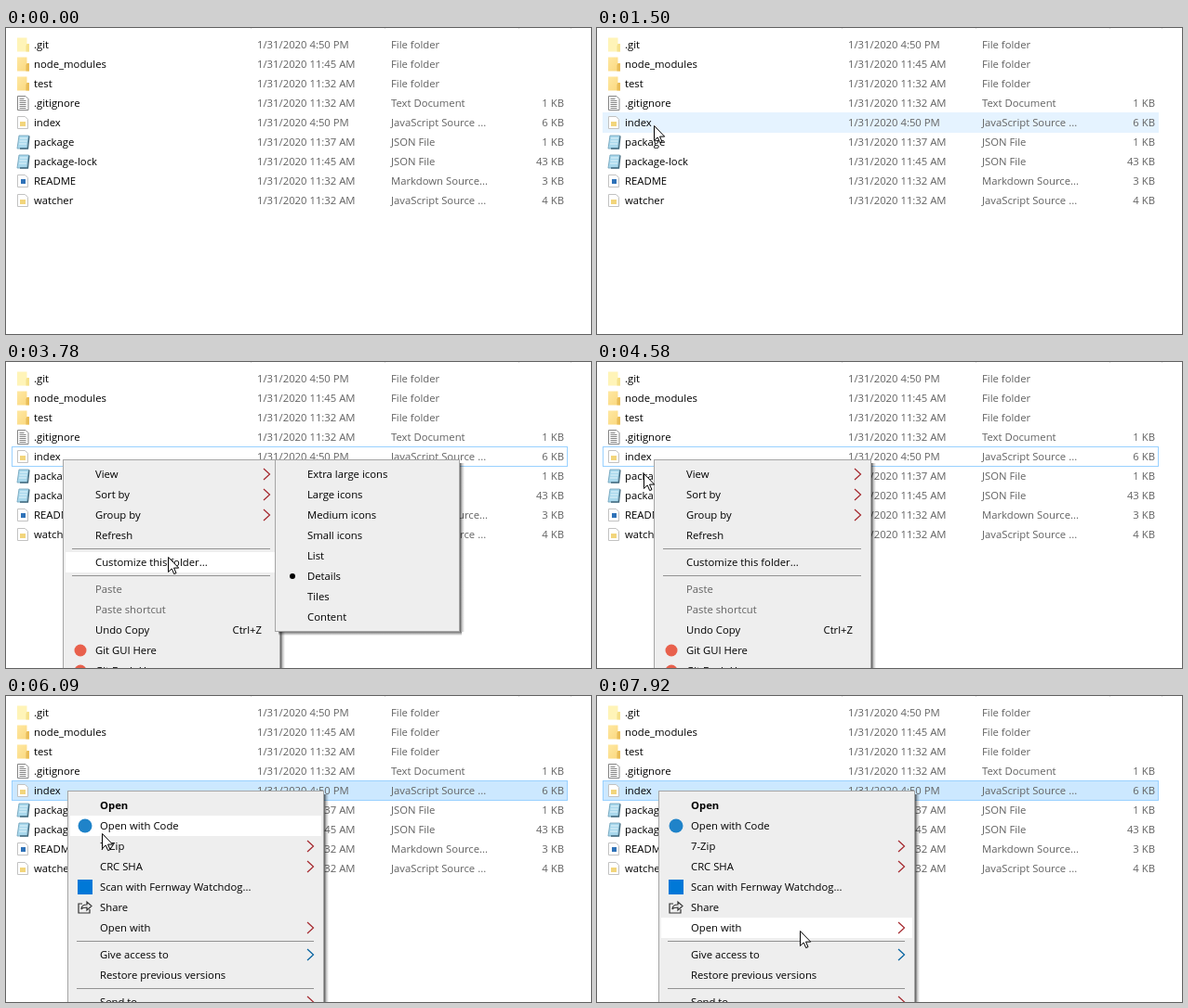
An HTML page for the animation above (8000 ms loop, 629 by 330 pixels).

```html
<!DOCTYPE html>
<html lang="en">
<head>
<meta charset="utf-8">
<title>File list with context menus</title>
<style>
  html, body { margin: 0; width: 100%; height: 100%; overflow: hidden; background: #fff; }
  svg { display: block; width: 629px; height: 330px; }
  text { font: 11.3px "Open Sans", "Noto Sans", sans-serif; fill: #000; white-space: pre; }
  .dim { fill: #626262; }
  .bold { font-weight: 700; }
  .end { text-anchor: end; }
  rect { shape-rendering: crispEdges; }
  .line { fill: none; stroke-width: 1.2; }
</style>
</head>
<body>
<svg viewBox="0 0 629 330">
  <defs>
    <linearGradient id="right"><stop stop-color="#000" stop-opacity=".65"/><stop offset=".5" stop-color="#000" stop-opacity=".22"/><stop offset="1" stop-color="#000" stop-opacity="0"/></linearGradient>
    <linearGradient id="down" x2="0" y2="1"><stop stop-color="#000" stop-opacity=".55"/><stop offset="1" stop-color="#000" stop-opacity="0"/></linearGradient>
    <linearGradient id="gold" x2="1" y2="1"><stop stop-color="#ffe8a2"/><stop offset="1" stop-color="#fad77c"/></linearGradient>
    <g id="folder">
      <path d="M0-7.500h10.500V-1H13V7.500H0z" fill="url(#gold)"/>
      <path d="M10.500-1H13V7.500H9.500V1z" fill="#e9bd58"/>
    </g>
    <g id="paleFolder">
      <path d="M0-7.500h10.500V-1H13V7.500H0z" fill="#fff4b8"/>
      <path d="M10.500-1H13V7.500H9.500V1z" fill="#f6e28e"/>
    </g>
    <path id="page" d="M.5-6.5h8l3 3v10H.5z" fill="#fff" stroke="#c2c2c2"/>
    <g id="doc">
      <path d="M.5-7.5h8.500l3 3v12H.5z" fill="#fff" stroke="#858585"/>
      <path d="M2.500-4.500h5m-5 2h7m-7 2h7m-7 2h7m-7 2h7m-7 2h7" stroke="#777" stroke-width=".9"/>
    </g>
    <g id="script"><use href="#page"/><rect x="3" y="-1" width="6" height="5" fill="#f2d57c"/></g>
    <g id="mark"><use href="#page"/><rect x="4" y="-2" width="5" height="5" fill="#2f72b8"/></g>
    <g id="pad">
      <path d="M2-7h10.500L10.500 7H0z" fill="#a9d8ec" stroke="#6d9fb8" stroke-width=".8"/>
      <path d="M3-4h8m-8.500 3h8m-8.500 3h8" stroke="#e4f5fb"/>
      <path d="M13-6.500 11.500 7H3" fill="none" stroke="#41697d" stroke-width="1.300"/>
    </g>
    <g id="share" class="line" stroke="#333">
      <path d="M-3-4h-4V6H5V2"/>
      <path d="M-4 2c0-4 3-5 6-5v-3l5 4.500L2 3V0c-3 0-5 0-6 2z"/>
    </g>
  </defs>
  <path d="M263.500 0v1M407.500 0v1M551.500 0v1M607.500 0v1" stroke="#ddd"/>
  <rect id="hover" x="6" width="598" height="22" fill="#e5f3ff"/>
  <rect id="focus" x="6.5" y="91.5" width="597" height="21" stroke="#99d1ff"/>
  <g id="files"></g>
  <g id="menus"></g>
  <path id="cursor" d="M.5.5v16l3.700-3.600 2.500 5.700 2.300-1-2.500-5.500h5.200z" fill="#fff" stroke="#000"/>
</svg>
<script>
const $ = id => document.getElementById(id);
const show = (node, on) => node.setAttribute('visibility', on ? 'visible' : 'hidden');
const label = (x, y, s, cls = '') => `<text x="${x}" y="${y + 4}" class="${cls}">${s}</text>`;
const use = (id, x, y) => `<use href="#${id}" x="${x}" y="${y}"/>`;

// name, icon, time, type, size
const files = [
  ['.git', 'paleFolder', '4:50 PM', 'File folder', ''],
  ['node_modules', 'folder', '11:45 AM', 'File folder', ''],
  ['test', 'folder', '11:32 AM', 'File folder', ''],
  ['.gitignore', 'doc', '11:32 AM', 'Text Document', '1 KB'],
  ['index', 'script', '4:50 PM', 'JavaScript Source ...', '6 KB'],
  ['package', 'pad', '11:37 AM', 'JSON File', '1 KB'],
  ['package-lock', 'pad', '11:45 AM', 'JSON File', '43 KB'],
  ['README', 'mark', '11:32 AM', 'Markdown Source...', '3 KB'],
  ['watcher', 'script', '11:32 AM', 'JavaScript Source ...', '4 KB']
];
$('files').innerHTML = files.map(([name, icon, time, type, size], i) => {
  const y = 18 + 21 * i;
  return use(icon, 12, y) + label(30, y, name) +
    label(270, y, '1/31/2020 ' + time, 'dim') + label(414, y, type, 'dim') + label(600, y, size, 'dim end');
}).join('');

const red = '#a4262c', blue = '#00609f';
const dot = (fill, r) => (x, y) => `<circle cx="${x}" cy="${y}" r="${r}" fill="${fill}"/>`;
const box = fill => (x, y) => `<rect x="${x - 8}" y="${y - 8}" width="16" height="16" fill="${fill}"/>`;
const git = dot('#e8604c', 6.5);

// An item is a label or [label, options]; '-' is a separator.
function menu(x, y, w, h, items) {
  const r = x + w, rows = [];
  let top = y + 5, body = '';
  for (const item of items) {
    if (item === '-') {
      body += `<rect x="${x + 10}" y="${top + 3}" width="${w - 21}" height="1" fill="#929292"/>`;
      top += 7;
      continue;
    }
    const [text, { arrow, icon, cls, key } = {}] = [].concat(item);
    const mid = top + 11;
    body += label(x + 35, mid, text, cls);
    if (icon) body += icon(x + 19, mid);
    if (key) body += label(r - 20, mid, key, 'end');
    if (arrow) body += `<path class="line" d="M${r - 18} ${mid - 6}l6.500 6-6.500 6" stroke="${arrow}"/>`;
    rows.push(top);
    top += 22;
  }
  const node = document.createElementNS('http://www.w3.org/2000/svg', 'g');
  node.innerHTML = `<rect x="${r}" y="${y + 4}" width="5" height="${h - 4}" fill="url(#right)"/>
    <rect x="${x + 4}" y="${y + h}" width="${w - 2}" height="4" fill="url(#down)"/>
    <g><rect x="${x + .5}" y="${y + .5}" width="${w - 1}" height="${h - 1}" fill="#eee" stroke="#a5a5a5"/>
    <rect x="${x + 3}" width="${w - 6}" height="22" fill="#fff"/>${body}</g>`;
  $('menus').append(node);
  const inner = node.querySelector('g'), bar = inner.querySelectorAll('rect')[1];
  return (t, from, to, cx, cy) => {
    const open = t > from && t < to;
    node.style.display = open ? '' : 'none';
    inner.setAttribute('opacity', Math.min(1, Math.max(0, (t - from) / 240)));
    const row = rows.find(v => cy >= v && cy < v + 22);
    const on = open && row !== undefined && cx > x + 2 && cx < r - 2;
    bar.style.display = on ? '' : 'none';
    if (on) bar.setAttribute('y', row);
  };
}

const folderMenu = menu(61, 105, 234, 260, [
  ['View', { arrow: red }], ['Sort by', { arrow: red }], ['Group by', { arrow: red }], 'Refresh', '-',
  'Customize this folder...', '-',
  ['Paste', { cls: 'dim' }], ['Paste shortcut', { cls: 'dim' }], ['Undo Copy', { key: 'Ctrl+Z' }],
  ['Git GUI Here', { icon: git }], ['Git Bash Here', { icon: git }]
]);
const viewMenu = menu(289, 105, 199, 186, [
  'Extra large icons', 'Large icons', 'Medium icons', 'Small icons', 'List',
  ['Details', { icon: dot('#000', 3) }], 'Tiles', 'Content'
]);
const fileMenu = menu(66, 102, 276, 260, [
  ['Open', { cls: 'bold' }], ['Open with Code', { icon: dot('#1f83c9', 7.5) }],
  ['7-Zip', { arrow: red }], ['CRC SHA', { arrow: red }],
  ['Scan with Fernway Watchdog...', { icon: box('#0078d7') }],
  ['Share', { icon: (x, y) => use('share', x, y) }], ['Open with', { arrow: red }], '-',
  ['Give access to', { arrow: blue }], 'Restore previous versions', '-', ['Send to', { arrow: red }]
]);

// Pointer path: time, x, y
const path = [
  [140, 122, 322], [540, 92, 222], [780, 74, 164], [940, 69, 148], [1500, 61, 105],
  [2980, 61, 105], [3140, 96, 117], [3460, 132, 124], [3620, 154, 160], [3780, 174, 210], [3860, 177, 216],
  [4100, 166, 200], [4420, 92, 146], [4740, 8, 93], [4900, 0, 77], [5060, 3, 93], [5220, 58, 101], [5300, 66, 102],
  [5770, 66, 102], [6170, 112, 160], [6250, 112, 160], [6650, 182, 247],
  [6720, 182, 247], [7520, 216, 322], [7600, 216, 322], [7920, 218, 253], [8000, 218, 253]
];
function pointer(t) {
  const i = Math.max(1, path.findIndex(p => p[0] >= t));
  const [a, b] = [path[i - 1], path[i]];
  const k = (t - a[0]) / (b[0] - a[0]);
  return [1, 2].map(n => Math.round(a[n] + (b[n] - a[n]) * k));
}

// The screen refreshes every 80 ms after each pause.
const starts = [6800, 5610, 3060, 2430, 140];
function tick(t) {
  const s = starts.find(v => v <= t);
  return s ? s + Math.floor((t - s) / 80) * 80 : 0;
}

function draw(t) {
  const seen = t >= 140;
  const [x, y] = seen ? pointer(t) : [-50, -50];
  show($('cursor'), seen);
  $('cursor').setAttribute('transform', `translate(${x} ${y})`);

  const row = Math.floor((y - 7) / 21);
  const free = t < 2430 || (t >= 4980 && t < 5300);
  show($('hover'), free && x >= 6 && row >= 0 && row < files.length);
  $('hover').setAttribute('y', 7 + 21 * row);
  show($('focus'), t >= 2430);
  $('focus').setAttribute('fill', t >= 5300 ? '#cce8ff' : 'none');

  folderMenu(t, 2590, 4980, x, y);
  viewMenu(t, 3460, 4020, x, y);
  fileMenu(t, 5610, 8000, x, y);
}

function frame() {
  draw(tick(performance.now() % 8000));
  requestAnimationFrame(frame);
}
frame();
</script>
</body>
</html>
```
